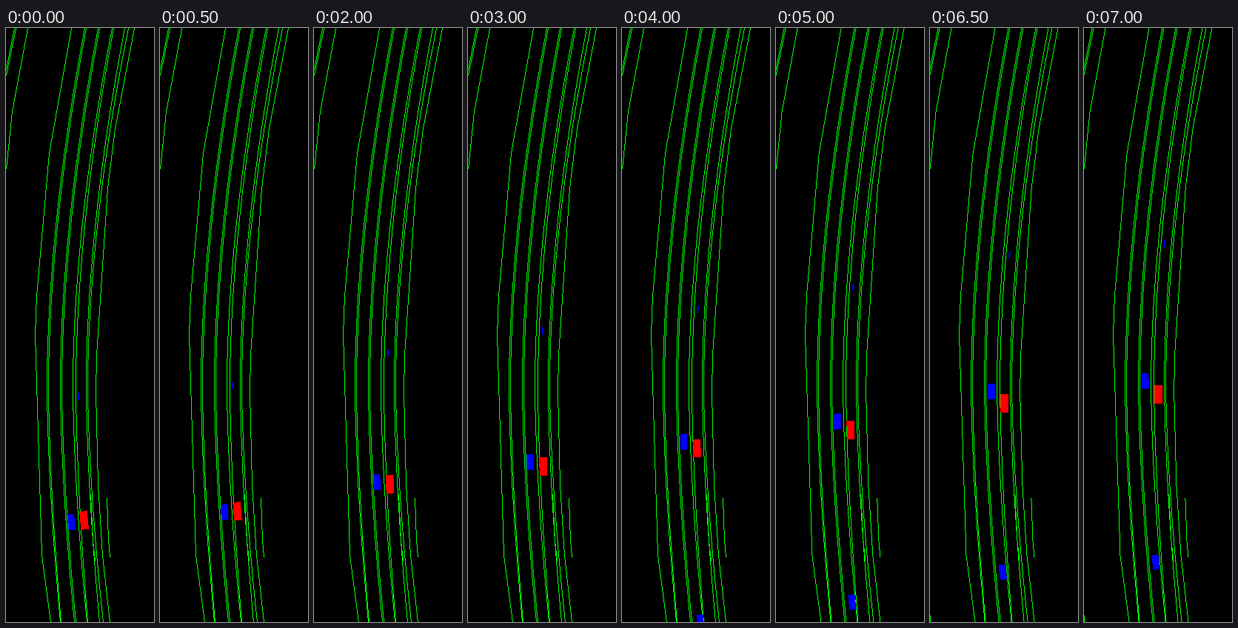
Write a matplotlib script that moves like this. It is 200x800 px and loops after 7.5 s.

```python
import numpy as np
import matplotlib.pyplot as plt
from matplotlib.animation import FuncAnimation

W, H, DPI = 200, 800, 100
FRAMES, STEP = 15, 500
GREEN, BLUE, RED = (0, 255, 0), (0, 0, 255), (255, 0, 0)
APEX = 480  # row where the road points straight up

# Lane dividers: x at the top, at the apex and at the bottom
LANES = [(106, 55, 73), (108, 57, 74), (124, 73, 92), (126, 75, 94),
         (143, 90, 109), (145, 94, 110), (160, 108, 126), (165, 110, 131)]

# Road borders and short stubs as (x, y) corners
BORDERS = [
    [(11, 0), (0, 55)],
    [(13, 0), (0, 63)],
    [(29, 0), (8, 112), (0, 189)],
    [(88, 0), (58, 168), (41, 360), (39, 412), (48, 710), (60, 800)],
    [(173, 0), (147, 135), (137, 215), (122, 440), (121, 490), (124, 615),
     (130, 710), (140, 800)],
    [(114, 628), (117, 690), (120, 717)],
    [(136, 633), (138, 690), (140, 712)],
    [(-1, 791), (-1, 800)],
]

# Cars: colour, width, length, position in pixels at t seconds
CARS = [
    (RED, 10.6, 24.8,
     lambda t: (100.2 + 5.3 * np.exp(-t / 2.4), 663 - 24.25 * t)),
    (BLUE, 9.6, 21,
     lambda t: (82.4 + 5.8 * np.exp(-t / 2.4), 665.5 - 27.1 * t)),
    (BLUE, 2, 9.5,
     lambda t: (98 + 0.6 * t + 0.13 * t * t, 496 - 29.3 * t)),
    (BLUE, 9.2, 19.8,
     lambda t: (118.3 - 3.07 * t, 907.2 - 26.8 * t)),
]

ROWS = np.arange(H)
PY, PX = np.mgrid[:H, :W] + 0.5


def lane(top, mid, low):
    up = np.clip((APEX - ROWS) / APEX, 0, 1) ** 1.79
    down = np.clip((ROWS - APEX) / (H - APEX), 0, 1) ** 1.65
    return mid + (top - mid) * up + (low - mid) * down


def border(corners):
    x, y = np.transpose(corners)
    return np.interp(ROWS, y, x, left=-9, right=-9)


ROADS = [lane(*xs) for xs in LANES] + [border(c) for c in BORDERS]


def smooth(u):
    u = np.clip(u, 0, 1)
    return u * u * (3 - 2 * u)


def draw_road(img, x):
    """One pixel per row, so the line stays hairline thin."""
    cols = np.rint(x).astype(int)
    seen = (cols >= 0) & (cols < W)
    img[ROWS[seen], cols[seen]] = GREEN


def draw_car(img, t, color, width, length, path):
    """A filled box pointing along its direction of travel."""
    pos = np.array(path(t))
    ux, uy = ahead = np.array(path(t + 0.01)) - pos
    ux, uy = ahead / np.hypot(ux, uy)
    dx, dy = PX - pos[0], PY - pos[1]
    along, across = dx * ux + dy * uy, dx * uy - dy * ux
    img[(abs(along) <= length / 2) & (abs(across) <= width / 2)] = color


def render(t):
    img = np.zeros((H, W, 3), np.uint8)
    turn = 0.0016 * smooth((t - 4) / 1.5)
    for x in ROADS:
        draw_road(img, x + turn * (ROWS - H / 2))
    for car in CARS:
        draw_car(img, t, *car)
    return img


fig = plt.figure(figsize=(W / DPI, H / DPI), dpi=DPI, facecolor="black")
ax = fig.add_axes([0, 0, 1, 1])
ax.axis("off")
view = ax.imshow(render(0), interpolation="nearest", aspect="auto")


def update(i):
    view.set_data(render(i * STEP / 1000))
    return [view]


anim = FuncAnimation(fig, update, frames=FRAMES, interval=STEP, repeat=True,
                     repeat_delay=0, blit=False)
plt.show()
```
